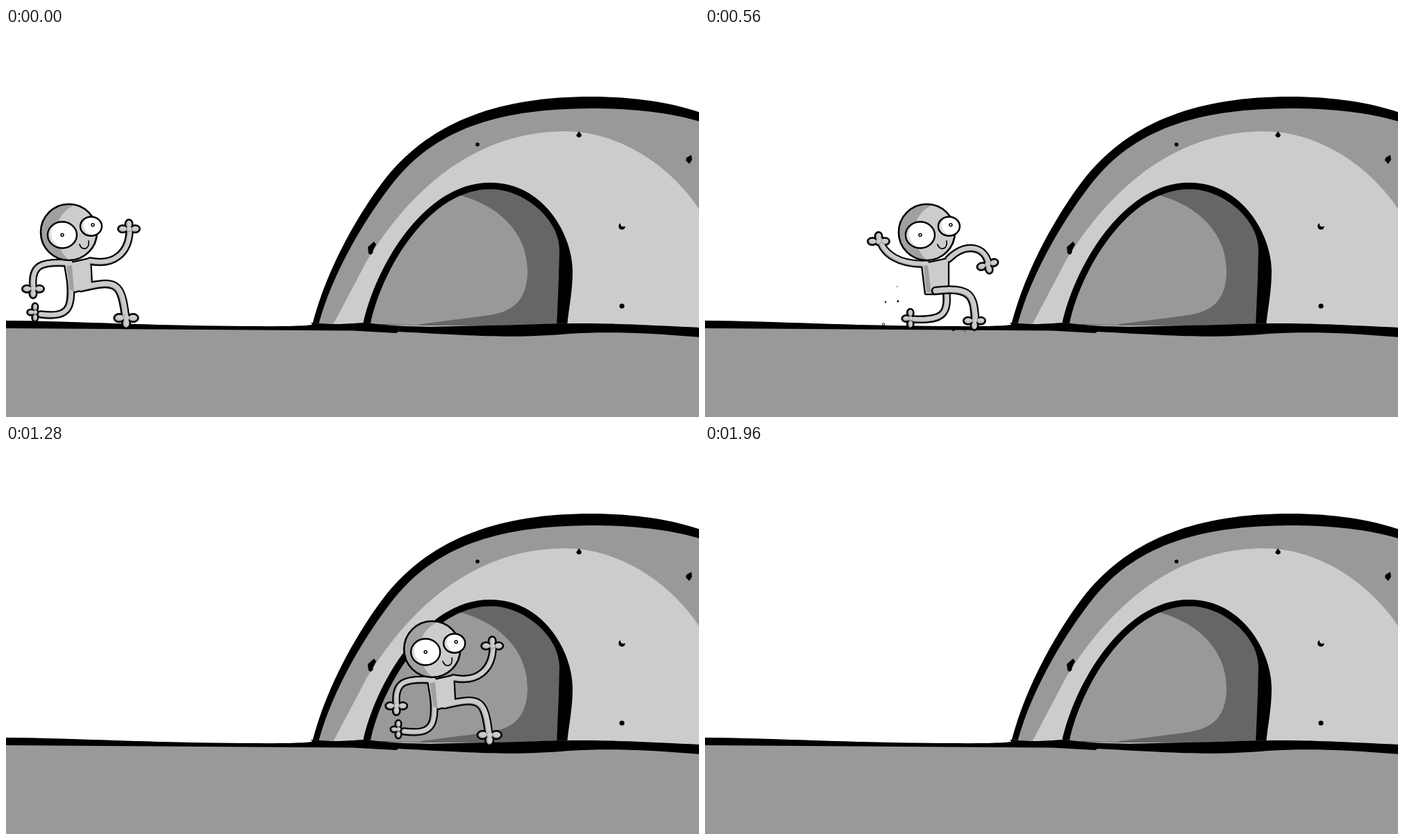
Write an HTML page with a canvas that moves like this. It is 998 px wide and 561 px high and loops after 2 s.

```html
<!DOCTYPE html>
<html lang="en">
<head>
<meta charset="utf-8">
<title>Walk into the cave</title>
<style>
html, body { margin: 0; width: 100%; height: 100%; overflow: hidden; background: #fff; }
canvas { display: block; }
</style>
</head>
<body>
<canvas id="stage" width="998" height="561"></canvas>
<script>
const ctx = document.getElementById('stage').getContext('2d');
const STEP = 40, FRAMES = 50, SPEED = 16.35, HOLD = 4;
const MID = '#999', LIGHT = '#ccc', DARK = '#666', SHADE = '#a0a0a0', INK = '#000';

const path = d => new Path2D(d);
function paint(shape, color) { ctx.fillStyle = color; ctx.fill(shape); }
function line(shape, width, color = INK) {
  ctx.lineWidth = width;
  ctx.strokeStyle = color;
  ctx.stroke(shape);
}
function oval(x, y, rx, ry = rx, turn = 0) {
  const shape = new Path2D();
  shape.ellipse(x, y, rx, ry, turn, 0, 2 * Math.PI);
  return shape;
}
const dot = (x, y, r, color = INK) => paint(oval(x, y, r), color);
function clipped(shape, draw) {
  ctx.save();
  ctx.clip(shape);
  draw();
  ctx.restore();
}

// Scenery
const sky = path('M0,0H998V561H0Z');
const dome = path('M441,428C462,345 511,262 548,215C615,132 715,99 843,99C905,99 960,108 1000,122V432Z');
const domeShade = path('M450,428C470,352 520,270 560,220C625,140 720,117 840,116C905,116 955,122 1000,135V434Z');
const domeLight = path('M471,428L520,335C600,205 700,149 805,149C880,149 955,195 1000,264V434Z');
const door = path('M514,428C530,350 600,222 698,223C775,223 816,300 816,350C816,380 811,400 808,430Z');
const hollow = path('M525,427C540,352 608,232 698,232.5C745,232 797,275 797,320L796,360L793,432Z');
const backWall = path('M645,239C715,255 751,300 751,350C751,400 722,411 690,415L597,427L592,432H500V239Z');
const surface = 'M0,422C100,423 200,429 340,430S430,426 441,425C480,429 490,426 520,425C580,434 640,430 740,428C830,424 880,426 1000,432';
const soil = path(surface + 'V562H0Z');
const edge = path(surface + 'V446C930,440 870,437 810,441C730,448 680,444 565,438L562,440L500,436.5L0,433Z');
const chips = path('M825,149l4,5l-1,3l-4,1l-3,-3ZM987,183l1,7l-4,6l-5,-5l1,-4ZM530,308l3,4l-4,8l-1,5l-3,2l-3,-2l-1,-9Z');
const visible = path('M0,0H770V243Q800,267 808,288Q815,332 815,362L809,428V561H0Z');

function scenery() {
  paint(sky, '#fff');
  paint(dome, INK);
  paint(domeShade, MID);
  paint(domeLight, LIGHT);
  paint(door, INK);
  paint(hollow, DARK);
  clipped(hollow, () => paint(backWall, MID));
  paint(soil, MID);
  paint(edge, INK);
  paint(chips, INK);
  dot(679, 168, 2.8);
  dot(887, 401, 3.6);
  dot(887, 286, 4.8);
  dot(889, 282.5, 4, LIGHT);
}

// Body parts share one interface: ink first, then fill.
function limb(d, w = 10) {
  const shape = path(d);
  return {
    ink: () => line(shape, w + 1.5),
    fill() {
      line(shape, w - 3, SHADE);
      ctx.translate(0.7, -0.5);
      line(shape, w - 4.5, LIGHT);
      ctx.translate(-0.7, 0.5);
    }
  };
}

// Three stubby fingers around a palm, the middle one pointing along turn.
function paw(x, y, turn, size = 1) {
  const blob = grow => {
    const shape = oval(x, y, 6 * size + grow);
    for (const side of [-1, 0, 1]) {
      const a = turn + side * 1.55, reach = (side ? 9 : 7) * size;
      shape.addPath(oval(x + reach * Math.cos(a), y + reach * Math.sin(a), 7.5 * size + grow, 6 * size + grow, a));
    }
    return shape;
  };
  const outer = blob(0.5), inner = blob(-2), core = blob(-3);
  return {
    ink: () => paint(outer, INK),
    fill() {
      paint(inner, SHADE);
      ctx.translate(0.6, -0.5);
      paint(core, LIGHT);
      ctx.translate(-0.6, 0.5);
    }
  };
}

function trunk(d, stripe) {
  const body = path(d), shade = path(stripe);
  return {
    ink: () => line(body, 4.5),
    fill() { paint(body, LIGHT); paint(shade, SHADE); }
  };
}

const UP = -Math.PI / 2, DOWN = Math.PI / 2, BACK = Math.PI;

const stride = [[
  limb('M91,350C98,405 92,418 50,413'),
  limb('M92,339C50,336 36,342 39,374'),
  limb('M108,375C160,362 166,368 172,416', 11),
  limb('M121,336C155,343 177,325 178,292'),
  trunk('M85,341L121,333L123,373L99,380L91,376Z', 'M87,343L95,342L98,380L92,377Z'),
  paw(39, 376, DOWN), paw(42, 410, BACK, 0.85),
  paw(173, 418, DOWN, 1.1), paw(177, 290, UP)
]];
const lunge = [[
  limb('M118,375C123,412 115,422 72,420'),
  paw(67, 419, BACK, 0.9)
], [
  limb('M90,340C50,342 28,325 23,306'),
  limb('M122,333C148,308 174,316 179,339'),
  trunk('M84,341L121,333V377L102,383H89Z', 'M86,343L92,342L97,382L90,381Z'),
  paw(21, 308, UP), paw(178, 341, DOWN - 0.3)
], [
  limb('M103,379C155,372 158,388 160,418', 11),
  paw(159, 422, DOWN)
]];

function group(parts) {
  parts.forEach(p => p.ink());
  parts.forEach(p => p.fill());
}

const skull = oval(90.5, 294.5, 40.5);
const glow = path('M104,253C62,268 66,315 93,337H140V253Z');
const smile = path('M106,312C108,321 121,321 119,307');

function eye(x, y, rx, ry, lookX, lookY) {
  const ball = oval(x, y, rx, ry);
  paint(ball, '#ddd');
  clipped(ball, () => paint(oval(x + 5, y - 2, rx, ry + 1), '#fff'));
  line(ball, 2.4);
  line(oval(lookX, lookY, 2), 1.5);
}

function head() {
  paint(skull, SHADE);
  clipped(skull, () => paint(glow, LIGHT));
  line(skull, 2.6);
  eye(81, 298.5, 21, 19, 81, 298.5);
  eye(122.5, 286, 15.5, 13.8, 125, 284);
  line(smile, 1.7);
}

function dust() {
  dot(31, 395, 1.2);
  dot(49, 394, 1.5);
  dot(48, 373, 0.7);
  dot(129, 435.5, 1.8);
  dot(145, 437.5, 0.8);
  line(oval(28, 427.5, 1.7), 1);
}

function draw(now) {
  const n = Math.floor(now / STEP) % FRAMES;
  const lunging = Math.floor(n / HOLD) % 2 === 1;
  scenery();
  clipped(visible, () => {
    ctx.translate(n * SPEED, 0);
    ctx.lineCap = ctx.lineJoin = 'round';
    if (lunging) dust();
    (lunging ? lunge : stride).forEach(group);
    head();
  });
  requestAnimationFrame(draw);
}
requestAnimationFrame(draw);
</script>
</body>
</html>
```
